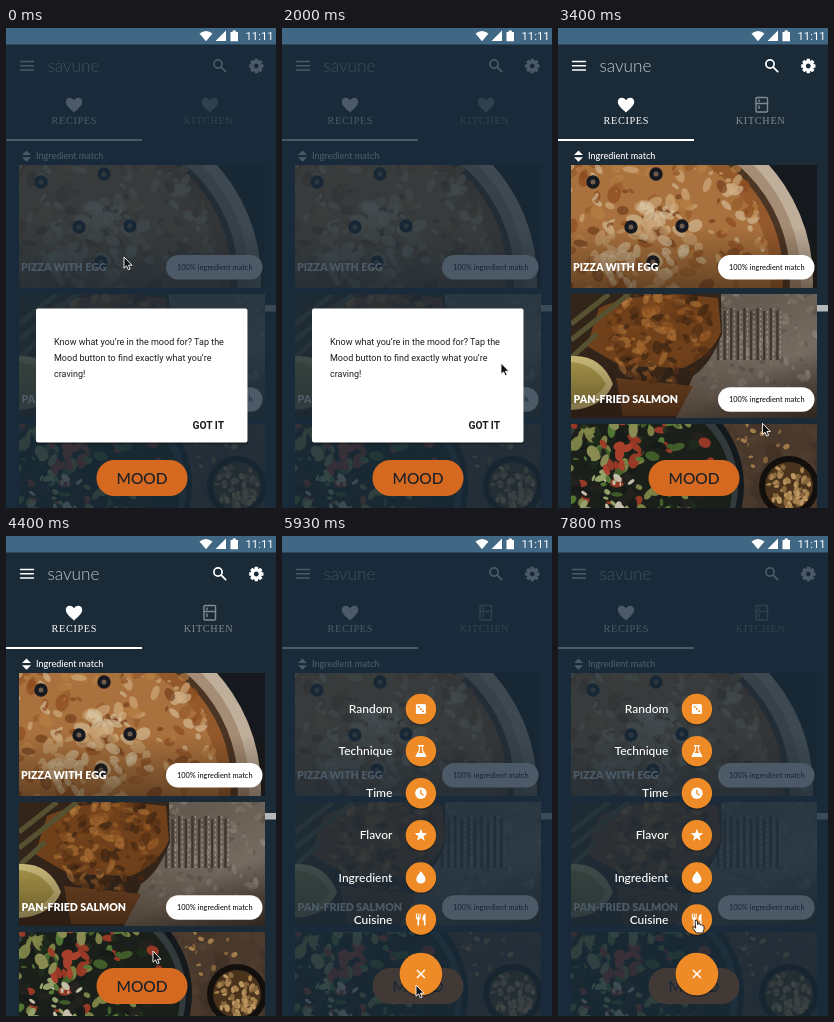
Recreate the animation shown at these times as an HTML page. Size 270x480 px, loop 8000 ms.

```html
<!DOCTYPE html>
<html lang="en">
<head>
<meta charset="utf-8">
<title>Recipe app</title>
<style>
html, body { margin: 0; width: 100%; height: 100%; overflow: hidden; background: #1b2a37; }
#stage { display: block; width: 100vw; height: 100vh; font-family: Lato, sans-serif; fill: #fff; }
.tab { font: 10.2px "Liberation Serif", serif; letter-spacing: .7px; }
.title { font-size: 10.6px; font-weight: 900; }
.pill { font-size: 7.4px; font-weight: 500; fill: #151515; }
.roboto { font-family: Roboto, sans-serif; fill: #1c1c1c; }
.label { font-size: 12px; font-weight: 500; text-anchor: end; }
.line { fill: none; stroke: #fff; stroke-linecap: round; }
</style>
</head>
<body>
<svg id="stage" viewBox="0 0 270 480">
  <defs>
    <path id="heart" d="M0 7.5C-5 3-8.2.5-8.2-3.2-8.2-7.8-2.6-8.8 0-4.8 2.6-8.8 8.2-7.8 8.2-3.2 8.2.5 5 3 0 7.5Z"/>
    <g id="mood">
      <rect x="90.5" y="432" width="91" height="36" rx="18" fill="#d4691f"/>
      <text x="136" y="455.5" font-size="15.5" font-weight="500" text-anchor="middle" fill="#1b2028">MOOD</text>
    </g>
    <linearGradient id="tray" x2="1" y2="1"><stop offset=".4" stop-color="#665b51"/><stop offset=".7" stop-color="#766b61"/><stop offset="1" stop-color="#3f362e"/></linearGradient>
    <linearGradient id="shade" x2="0" y2="1"><stop offset=".5" stop-color="#24170d" stop-opacity="0"/><stop offset="1" stop-color="#24170d" stop-opacity=".5"/></linearGradient>
  </defs>

  <rect width="270" height="480" fill="#1b2a37"/>
  <path class="line" stroke-width="1.4" d="M14.5 33.5H27.5M14.5 37.7H27.5M14.5 42H27.5"/>
  <text x="41.5" y="44" font-size="17.2" font-weight="300" fill="#c3cad0">savune</text>
  <g class="line" stroke-width="1.7"><circle cx="212" cy="36" r="4.1"/><path d="M215.2 39.2L219.7 43.7"/></g>
  <g id="gear" transform="translate(250.3 38) scale(.92)"><circle r="4.4" fill="none" stroke="#fff" stroke-width="3.6"/></g>

  <use href="#heart" x="68" y="77"/>
  <text class="tab" x="45.5" y="96.3">RECIPES</text>
  <g opacity=".45">
    <use id="heart2" href="#heart" x="204" y="77"/>
    <g id="fridge" class="line" stroke-width="1.4"><rect x="198" y="69.5" width="11.5" height="14.5" rx="1"/><path d="M198 75.5H209.5M201 72V73.5M201 78V80.5"/></g>
    <text class="tab" x="177.8" y="96.3">KITCHEN</text>
  </g>
  <rect y="111" width="136" height="2"/>
  <path d="M16 127L20.5 122.5 25 127ZM16 129.3L20.5 133.8 25 129.3Z"/>
  <text x="30" y="131.3" font-size="9.05" font-weight="500">Ingredient match</text>

  <svg id="pizza" x="13" y="137" width="246" height="123"></svg>
  <svg id="salmon" x="13" y="266" width="246" height="124"></svg>
  <svg id="salad" x="13" y="396" width="246" height="84"></svg>
  <text class="title" x="15" y="243">PIZZA WITH EGG</text>
  <text class="title" x="15.5" y="375.3">PAN-FRIED SALMON</text>
  <rect x="160" y="227" width="96.5" height="24.5" rx="12.2"/>
  <rect x="160" y="359.3" width="96.5" height="24.5" rx="12.2"/>
  <text class="pill" x="171" y="241.8">100% ingredient match</text>
  <text class="pill" x="171" y="374.1">100% ingredient match</text>
  <use href="#mood"/>
  <rect x="259" y="277" width="11" height="6.5" fill="#b4b8bb"/>

  <rect id="veil" y="16" width="270" height="464" fill="#192c3c" opacity=".78"/>

  <g id="status">
    <rect width="270" height="16.5" fill="#406784"/>
    <path d="M193.5 5.5Q200 .5 206.5 5.5L200 13.3ZM220 2.5V13H209.5ZM224.5 4H226.7V2.5H229.8V4H232V13.3H224.5Z"/>
    <text x="239.5" y="12.3" font-family="Roboto, sans-serif" font-size="11.3">11:11</text>
  </g>

  <g id="dialog">
    <rect x="30" y="281.5" width="212" height="135" rx="2" fill="#000" opacity=".3"/>
    <rect x="30" y="280.5" width="211.5" height="134" rx="2"/>
    <g class="roboto" font-size="9.03">
      <text x="48" y="317">Know what you’re in the mood for? Tap the</text>
      <text x="48" y="332.7">Mood button to find exactly what you’re</text>
      <text x="48" y="348.5">craving!</text>
      <text x="186.5" y="400.5" font-size="10.3" font-weight="700">GOT IT</text>
    </g>
    <use href="#mood"/>
  </g>

  <g id="menu"></g>

  <g id="cursor" stroke-linejoin="round">
    <path id="arrow" d="M0 0V11.2L2.6 8.9 4.3 12.8 6.2 12 4.5 8.2H8Z" fill="#111" stroke="#fff" stroke-width=".9"/>
    <path id="hand" d="M-1 .8Q0-.6 1.2.8L1.8 4.8Q3-.0 4.2 5 5.4 4 6.3 5.6 7.8 4.8 8 6.6V9.5L6.6 13H.4L-3.2 8.2Q-3.4 6.4-1.6 7L-.3 8.2Z" fill="#fff" stroke="#111" stroke-width=".9"/>
  </g>
</svg>
<script>
const $ = id => document.getElementById(id);
const add = (id, markup) => $(id).insertAdjacentHTML('beforeend', markup);
const show = (id, on) => { $(id).style.display = on ? '' : 'none'; };

let seed = 7;
const rand = () => (seed = seed * 16807 % 2147483647) / 2147483647;
const disc = (x, y, r, fill, extra = '') => `<circle cx="${x}" cy="${y}" r="${r}" fill="${fill}" ${extra}/>`;
const shape = (d, fill, extra = '') => `<path d="${d}" fill="${fill}" ${extra}/>`;

// Random ellipses spread over a disc
function scatter(n, cx, cy, spread, min, max, colors, opacity = 1) {
  let out = '';
  for (let i = 0; i < n; i++) {
    const a = rand() * 6.283, d = Math.sqrt(rand()) * spread, r = min + rand() * (max - min);
    const x = cx + Math.cos(a) * d, y = cy + Math.sin(a) * d;
    out += `<ellipse rx="${r}" ry="${r * (.4 + rand() * .4)}" fill="${colors[i % colors.length]}" opacity="${opacity}" transform="translate(${x} ${y}) rotate(${rand() * 180})"/>`;
  }
  return out;
}

const olive = (x, y) => disc(x, y, 4.6, '#6f5c4c', 'stroke="#16191f" stroke-width="4.2"');
add('pizza',
  '<rect width="246" height="123" fill="#15181c"/>' +
  disc(70, 115, 172, '#bfae9a') + disc(70, 114, 160, '#a58c74') + disc(73, 112, 146, '#4a3423') +
  disc(75, 110, 137, '#94592b') + disc(73, 112, 127, '#a9713d') +
  scatter(330, 70, 75, 122, 2, 9, ['#cfae80', '#8a4a1e', '#b97f45', '#d6bd98', '#95592a', '#6f3c1b'], .65) +
  scatter(60, 75, 85, 48, 3, 9, ['#d9c4a2', '#c9a576'], .6) +
  olive(22, 17) + olive(85, 9) + olive(60, 62) + olive(111, 61) + olive(82, 97) +
  '<rect width="246" height="123" fill="url(#shade)"/>');

let tines = '';
for (let i = 0; i < 10; i++) tines += `M${147 + i * 6.6} ${14 + i % 2 * 3}V66`;
add('salmon',
  '<rect width="246" height="124" fill="url(#tray)"/>' +
  scatter(160, 195, 50, 75, 1, 5, ['#9a9187', '#4f463e', '#85796d'], .45) +
  shape(tines, 'none', 'stroke="#3f3831" stroke-width="2.4"') +
  shape(tines, 'none', 'stroke="#a1988d" stroke-width="1" stroke-dasharray="2 3" transform="translate(3)"') +
  shape('M0 0H150L151 40Q140 70 122 82L105 124H0Z', '#33241a') +
  shape('M28 14Q70-6 147 4L150 38Q140 62 112 74L50 72 16 52Z', '#70401a') +
  shape('M45 84L122 92 106 122H52Z', '#6b4020') +
  scatter(190, 88, 38, 52, 2, 8, ['#a2622a', '#4b2912', '#b67a3c', '#62371a', '#7d481d', '#2f1d10'], .55) +
  shape('M0 46L58 0M0 30L38 0M0 64L26 40', 'none', 'stroke="#565231" stroke-width="5"') +
  shape('M0 62Q30 60 42 90Q32 114 0 116Z', '#c7b878') + shape('M0 68Q24 70 35 90Q26 106 0 110Z', '#a59448') +
  '<rect width="246" height="124" fill="url(#shade)"/>');

add('salad',
  '<rect width="246" height="84" fill="#49382c"/>' +
  scatter(40, 200, 40, 60, 4, 14, ['#574334', '#3a2b22'], .4) +
  disc(72, 62, 101, '#14191d') + disc(72, 62, 95, '#333a3c') + disc(72, 64, 89, '#1a2019') +
  scatter(210, 66, 46, 78, 2, 8, ['#42602c', '#9c3a27', '#7f8548', '#1f2c1c', '#24221f', '#557a36', '#161a18'], .95) +
  scatter(22, 40, 74, 28, 2, 6, ['#c3bda9', '#94a068']) +
  scatter(12, 42, 20, 30, 5, 8, ['#8a8b52', '#a8402c']) +
  scatter(14, 190, 18, 26, 2, 3.5, ['#a07a48', '#82623a']) +
  disc(218, 62, 30, '#120f0d') + disc(218, 62, 24, '#49331d') +
  scatter(60, 218, 62, 21, 2.5, 3.8, ['#a8824e', '#bb9560', '#86663a']));

let teeth = '';
for (let i = 0; i < 8; i++) teeth += `<rect x="-1.9" y="-7.8" width="3.8" height="4" rx=".6" transform="rotate(${i * 45})"/>`;
add('gear', teeth);

const orange = '#ef8b27', white = '#fff';
let star = 'M';
for (let i = 0; i < 10; i++) {
  const r = i % 2 ? 2.7 : 6.6, a = i * Math.PI / 5;
  star += `${r * Math.sin(a)} ${-r * Math.cos(a)} `;
}
const items = [
  ['Random', '<rect x="-5" y="-5" width="10" height="10" rx="1.5"/>' + disc(-2.2, -2.2, 1, orange) + disc(0, 0, 1, orange) + disc(2.2, 2.2, 1, orange)],
  ['Technique', shape('M-3-6H3V-4.8H2V-1L5.4 5Q5.6 6 4.6 6H-4.6Q-5.6 6-5.4 5L-2-1V-4.8H-3Z', white) + shape('M-1-4.5H1V-.6L2.3 2H-2.3L-1-.6Z', orange)],
  ['Time', disc(0, 0, 5.8, white) + shape('M0-3.5V.3L2.8 2', 'none', `stroke="${orange}" stroke-width="1.3"`)],
  ['Flavor', shape(star + 'Z', white)],
  ['Ingredient', shape('M0-6.2C2-3.5 4.6-.8 4.6 1.8A4.6 4.4 0 0 1-4.6 1.8C-4.6-.8-2-3.5 0-6.2Z', white)],
  ['Cuisine', shape('M-5-6V-2Q-5 0-3.4.2V6H-1.8V.2Q-.2 0-.2-2V-6H-1.2V-2H-2.1V-6H-3.1V-2H-4V-6ZM4.6-6Q1.6-5 1.6-1V1H3V6H4.6Z', white)]
];
const column = 138.9;
items.forEach(([name, icon], i) => {
  const y = 173 + i * 42.1;
  add('menu', disc(column, y + 1.5, 15.3, '#000', 'opacity=".25"') + disc(column, y, 15.2, orange) +
    `<g transform="translate(${column} ${y})">${icon}</g><text class="label" x="110.4" y="${y + 4.1}">${name}</text>`);
});
add('menu', disc(column, 440, 21.5, '#000', 'opacity=".25"') + disc(column, 438, 21.3, orange) +
  shape('M-4-4L4 4M4-4L-4 4', 'none', `stroke="#fff" stroke-width="1.5" transform="translate(${column} 438)"`));

// Pointer path: time, x, y
const path = [
  [0, 118, 229], [70, 118, 229], [330, 137, 247], [600, 137, 247], [1470, 202, 315], [1670, 219, 335],
  [2000, 219, 335], [2870, 210, 392], [3070, 210, 393], [3270, 210, 393], [4070, 176, 407],
  [4400, 147, 415], [4930, 136, 421], [5000, 136, 423], [5500, 134, 449], [6730, 134, 449],
  [7330, 149, 421], [7470, 148, 418], [7800, 138, 384], [8000, 138, 384]
];

function pointer(t) {
  const i = Math.max(1, path.findIndex(p => p[0] > t));
  const [t0, x0, y0] = path[i - 1], [t1, x1, y1] = path[i];
  const k = (t - t0) / (t1 - t0);
  return [x0 + (x1 - x0) * k, y0 + (y1 - y0) * k];
}

function draw(now) {
  const t = now % 8000, intro = t < 3330, menu = t >= 5930;
  const [x, y] = pointer(t);
  const hand = menu ? y < 399 : !intro && y > 432;
  show('dialog', intro);
  show('heart2', intro);
  show('fridge', !intro);
  show('veil', intro || menu);
  show('menu', menu);
  show('hand', hand);
  show('arrow', !hand);
  $('cursor').setAttribute('transform', `translate(${x} ${y})`);
}

const start = performance.now();
function tick() {
  draw(performance.now() - start);
  requestAnimationFrame(tick);
}
tick();
</script>
</body>
</html>
```
